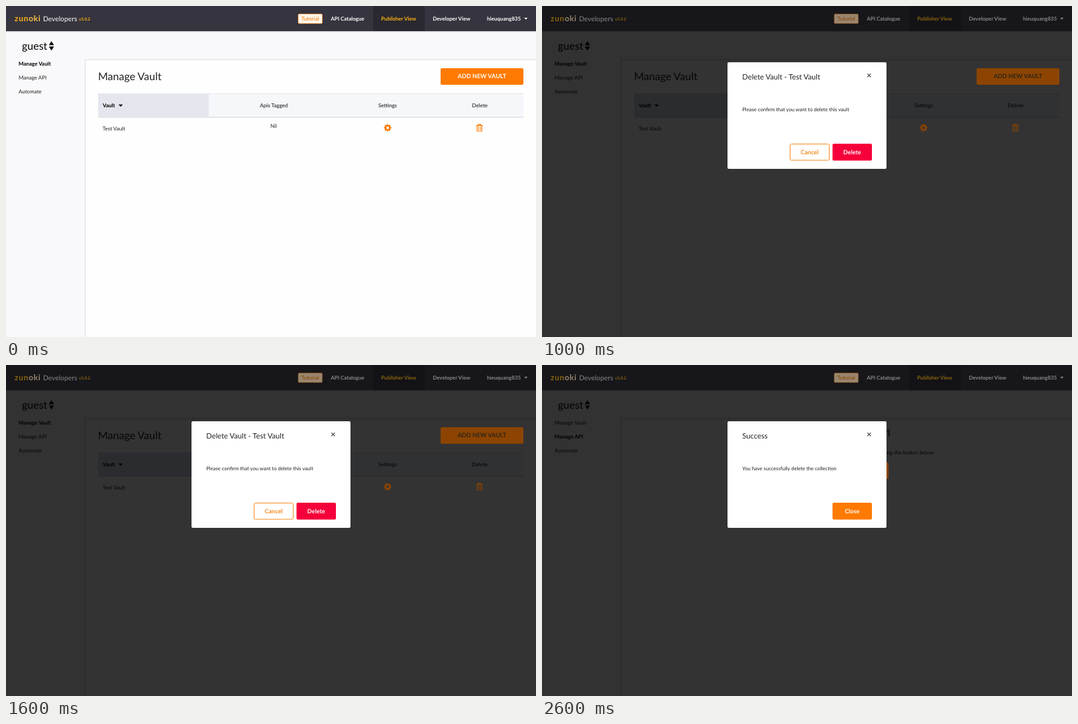
An HTML page for the animation above (3000 ms loop, 800x500 px).

```html
<!DOCTYPE html>
<html lang="en">
<head>
<meta charset="utf-8">
<title>Manage Vault</title>
<style>
html, body { margin: 0; width: 100%; height: 100%; overflow: hidden; }
svg {
  display: block; width: 800px; height: 500px;
  font: 8px Lato, sans-serif; text-rendering: geometricPrecision;
  --page: #f9f9fb; --panel: #fefefe; --edge: #dedee2; --ink: #222;
  --bar: #36343e; --tab: #2a2830; --nav: #fff; --gold: #fdb515; --pale: #fcc648;
  --badge: #fff5e8; --orange: #ff7a00; --label: #fff;
  --head: #f5f7fb; --sort: #e3e7ed; --rule: #cdd1d7; --strong: #000;
}
svg.dim {
  --page: #323233; --panel: #333; --edge: #262627; --ink: #070707;
  --bar: #17161a; --tab: #131216; --nav: #888; --gold: #8a6510; --pale: #93866c;
  --badge: #98866f; --orange: #8c4400; --label: #30251c;
  --head: #303133; --sort: #2a2c2f; --rule: #252628; --strong: #000;
}
text { fill: var(--ink); }
.b { font-weight: 700; }
.m { text-anchor: middle; }
.e { text-anchor: end; }
.h { font-size: 16px; }
.title { font-size: 11.2px; fill: #222; }
.body { font-size: 7.65px; fill: #222; }
.btn { font-size: 9px; font-weight: 700; text-anchor: middle; }
.strong { fill: var(--strong); }
.nav { fill: var(--nav); }
.gold { fill: var(--gold); }
.pale { fill: var(--pale); }
.orange { fill: var(--orange); }
.label { fill: var(--label); }
.white { fill: #fff; }
</style>
</head>
<body>
<svg id="stage" viewBox="0 0 800 500">
  <defs>
    <linearGradient id="shade" x1="0" y1="0" x2="0" y2="1">
      <stop offset="0" stop-opacity=".18"/>
      <stop offset="1" stop-opacity="0"/>
    </linearGradient>
  </defs>

  <rect width="800" height="500" fill="var(--page)"/>
  <rect x="119" y="80.5" width="681" height="420" fill="var(--edge)"/>
  <rect x="120" y="81.5" width="680" height="419" fill="var(--panel)"/>

  <g id="header">
    <rect y="38" width="800" height="2" fill="url(#shade)"/>
    <rect width="800" height="38" fill="var(--bar)"/>
    <rect x="554" width="78" height="38" fill="var(--tab)"/>
    <text x="13" y="23" class="b gold" font-size="12" letter-spacing=".7">zun<tspan class="pale">oki</tspan></text>
    <text x="56" y="23" class="nav" font-size="10.3">Developers</text>
    <text x="110" y="22" class="b gold" font-size="6.3">v3.0.2</text>
    <rect x="441" y="12" width="36.5" height="14.5" rx="1.5" fill="var(--badge)" stroke="var(--orange)" stroke-width=".6"/>
    <text x="459.2" y="22" class="m orange" font-size="8.2">Tutorial</text>
    <text x="515.5" y="22" class="b m nav">API Catalogue</text>
    <text x="592.7" y="22" class="b m gold">Publisher View</text>
    <text x="672.5" y="22" class="b m nav">Developer View</text>
    <text x="726" y="22" class="b nav">hieuquang835</text>
    <path d="M782 17.7h5.4l-2.7 2.8z" class="nav"/>
  </g>

  <text x="24" y="65.5" class="h strong">guest</text>
  <path d="M64.7 59.3l3.9-6 3.9 6zM64.7 61.3h7.8l-3.9 6z" class="strong"/>
  <g id="menu">
    <text x="19" y="90">Manage Vault</text>
    <text x="19" y="111">Manage API</text>
    <text x="19" y="132.3">Automate</text>
  </g>

  <g id="vaults">
    <text x="139" y="112.3" class="h">Manage Vault</text>
    <rect x="656" y="94" width="125" height="25" rx="2" class="orange"/>
    <text x="718.5" y="109.3" class="btn label">ADD NEW VAULT</text>
    <rect x="139" y="132.5" width="642" height="36" fill="var(--rule)"/>
    <rect x="139" y="133" width="642" height="34.5" fill="var(--head)"/>
    <rect x="139" y="133" width="167" height="34.5" fill="var(--sort)"/>
    <text x="146" y="153" class="b strong">Vault</text>
    <path d="M169.8 148.8h6.6l-3.3 3.4z" class="strong"/>
    <text x="404.3" y="153" class="m" font-weight="500">Apis Tagged</text>
    <text x="576" y="153" class="m" font-weight="500">Settings</text>
    <text x="715.3" y="153" class="m" font-weight="500">Delete</text>
    <text x="145.8" y="188">Test Vault</text>
    <text x="404" y="183.7" class="m">Nil</text>
    <path id="gear" class="orange" fill-rule="evenodd"/>
    <g fill="none" stroke="var(--orange)" stroke-width="1.2">
      <path d="M709.8 180.6h9.8M712.8 180.3v-1.5h3.6v1.5M711.2 180.8v8.2h7v-8.2"/>
      <path d="M713.4 182.6v4.6M716 182.6v4.6" stroke-width="1"/>
    </g>
  </g>

  <g id="empty">
    <text x="526" y="108.3" class="h e">API</text>
    <text x="591.5" y="135" class="e">using the button below</text>
    <rect x="398" y="147" width="125" height="25" rx="2" class="orange"/>
  </g>

  <g id="modal">
    <rect x="280" y="85" width="240" height="161" rx="2" class="white"/>
    <path d="M491.2 102.2l5.2 5.2M496.4 102.2l-5.2 5.2" stroke="#666" stroke-width="1.5"/>
    <g id="ask">
      <text x="302.3" y="110.8" class="title">Delete Vault - Test Vault</text>
      <text x="302.3" y="159.3" class="body">Please confirm that you want to delete this vault</text>
      <rect x="374.5" y="208.5" width="59" height="24.5" rx="2" fill="#fff" stroke="#f58a1f"/>
      <text x="404" y="223.7" class="btn" style="fill:#f58a1f">Cancel</text>
      <rect x="438.5" y="208" width="59.5" height="25.5" rx="2" fill="#f5003a"/>
      <text x="468.2" y="223.7" class="btn white">Delete</text>
    </g>
    <g id="done">
      <text x="302.3" y="110.8" class="title">Success</text>
      <text x="302.3" y="159.3" class="body">You have successfully delete the collection</text>
      <rect x="438.5" y="208" width="59.5" height="25.5" rx="2" fill="#ff7a00"/>
      <text x="468.2" y="223.7" class="btn white">Close</text>
    </g>
  </g>
</svg>
<script>
const $ = id => document.getElementById(id);
const show = (id, on) => { $(id).style.display = on ? '' : 'none'; };
const STEP = 1000, STEPS = 3;

// Eight teeth around a ring with a round hole.
function gearPath(cx, cy) {
  const pts = [];
  for (let i = 0; i < 8; i++) {
    for (const [r, da] of [[4.2, -0.3], [5.7, -0.17], [5.7, 0.17], [4.2, 0.3]]) {
      const a = i * Math.PI / 4 + da;
      pts.push((cx + r * Math.cos(a)).toFixed(2) + ' ' + (cy + r * Math.sin(a)).toFixed(2));
    }
  }
  return `M${pts.join('L')}ZM${cx - 2} ${cy}a2 2 0 1 0 4 0a2 2 0 1 0 -4 0Z`;
}
$('gear').setAttribute('d', gearPath(576, 184));

let shown = -1;
function draw(ms) {
  const step = Math.floor(ms / STEP) % STEPS;
  if (step === shown) return;
  shown = step;
  const done = step === 2;
  $('stage').classList.toggle('dim', step > 0);
  show('vaults', !done);
  show('empty', done);
  show('modal', step > 0);
  show('ask', step === 1);
  show('done', done);
  [...$('menu').children].forEach((item, i) => {
    item.setAttribute('class', i === (done ? 1 : 0) ? 'b strong' : '');
  });
}

const start = performance.now();
function tick() {
  draw(performance.now() - start);
  requestAnimationFrame(tick);
}
tick();
</script>
</body>
</html>
```
